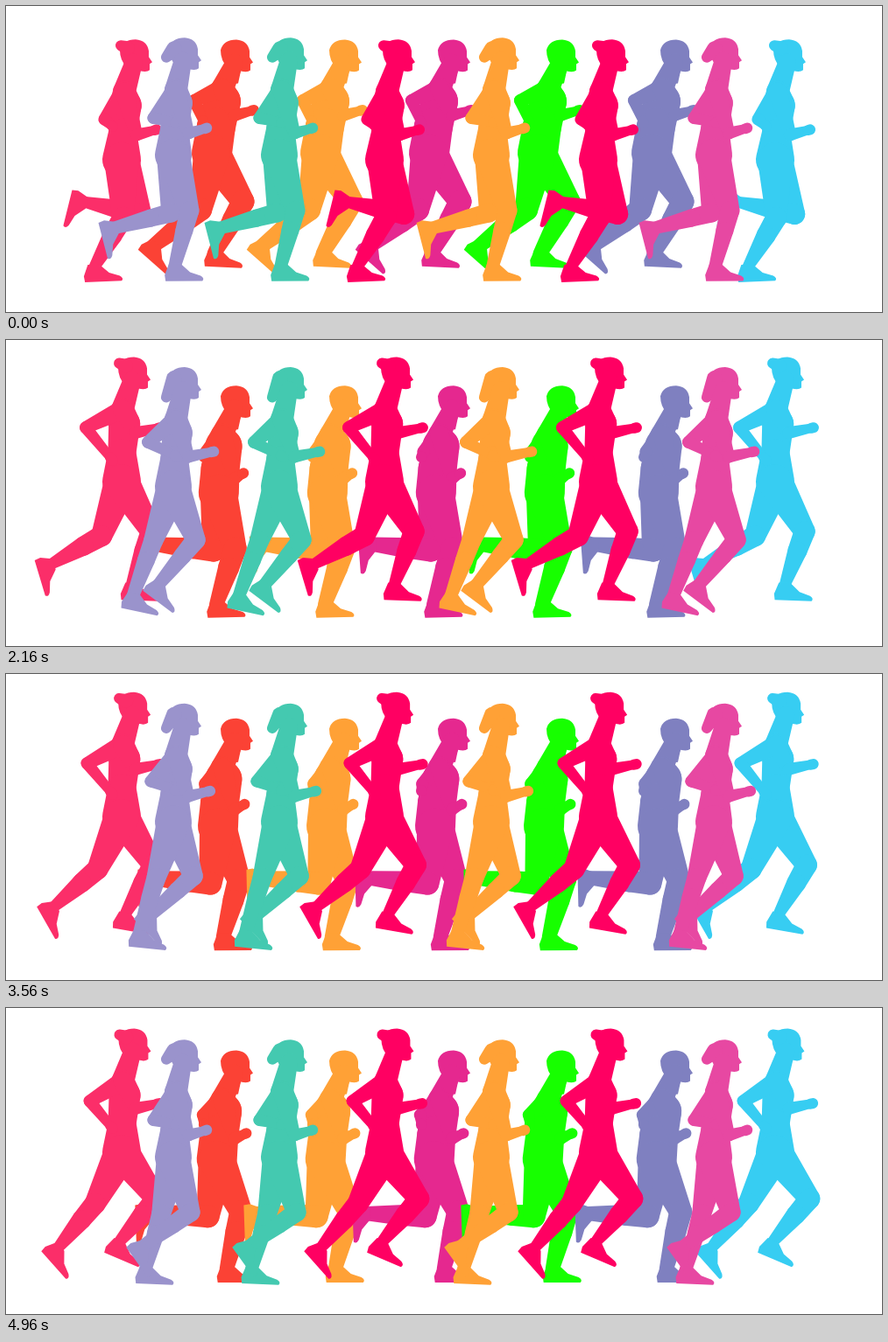
Write an HTML page with a canvas that moves like this. It is 1000x350 px and loops after 5000 ms.

```html
<!DOCTYPE html>
<html lang="en">
<head>
<meta charset="utf-8">
<title>Runners</title>
<style>
html, body { margin: 0; height: 100%; overflow: hidden; background: #fff; }
canvas { display: block; }
</style>
</head>
<body>
<canvas id="stage" width="1000" height="350"></canvas>
<script>
const ctx = document.getElementById('stage').getContext('2d');
const LOOP = 5000, TICK = 40, STEP = 1500;

// Each point moves as base + bob * swing, where bob = cos peaks when the body is lowest (time `low`).
// `gait` is the ankle's closed path around the hip (x, y, foot angle) over two steps, from landing on.
const bun = {
  low: -60, land: 1040,
  head: { base: [146, 47], swing: [1, 9.5] },
  hip: { base: [132, 169], swing: [0, 7] },
  elbow: { base: [102, 115], swing: [11, 15] },
  hand: { base: [174, 121], swing: [-2, 21] },
  rest: [122, 138], neck: [-12, 42],
  chest: 18, waist: 16, pelvis: 22, thigh: 20, knee: 12, ankle: 6, bun: true,
  gait: [[26, 129, -7], [-37, 124, 0], [-78, 106, 58], [-80, 56, 115], [-41, 50, 100], [1, 113, 12]],
  team: [[0, '#fb2e69'], [300, '#ff0062'], [544, '#ff0062'], [746, '#37cdf2']]
};
const ponytail = {
  low: 230, land: 1040,
  head: { base: [203, 50.5], swing: [0, 6.5] },
  hip: { base: [191, 168.5], swing: [0, 3.5] },
  elbow: { base: [164, 120], swing: [8, 14] },
  hand: { base: [235, 131], swing: [-10, 15] },
  hair: { base: [-20, 13], swing: [0, -15] },
  rest: [196, 134], neck: [-9, 42],
  chest: 17, waist: 16, pelvis: 21, thigh: 19, knee: 11, ankle: 7,
  gait: [[14, 130, 0], [-1, 129, 0], [-38, 129, 5], [-69, 111, 44], [-67, 83, 76], [-29, 107, 48]],
  team: [[0, '#9a93cc'], [121, '#44c9b0'], [363, '#ffa136'], [617, '#e748a2']]
};
const shorthair = {
  low: 730, land: 460,
  head: { base: [262, 63.5], swing: [0, 7] },
  hip: { base: [239, 171.5], swing: [4, 3.5] },
  elbow: { base: [222, 118], swing: [7, 10] },
  hand: { base: [277, 136], swing: [-6, 17] },
  rest: [226, 134], neck: [-15, 38],
  chest: 21, waist: 22, pelvis: 23, thigh: 21, knee: 13, ankle: 8,
  gait: [[11, 126, 0], [-32, 126, 2], [-65, 109, 38], [-78, 62, 88], [-56, 68, 65], [0, 113, 5]],
  team: [[0, '#fb4235'], [124, '#ffa136'], [248, '#e5288f'], [372, '#17ff00'], [502, '#7f80c0']]
};
const kinds = [shorthair, bun, ponytail];

const add = (a, b) => [a[0] + b[0], a[1] + b[1]];
const mix = (a, b, f) => [a[0] + (b[0] - a[0]) * f, a[1] + (b[1] - a[1]) * f];
const sway = (part, bob) => part.base.map((v, i) => v + bob * part.swing[i]);

// Smooth closed curve through the gait points, evenly spaced in time.
function ankleAt(gait, time) {
  const n = gait.length, s = ((time / (2 * STEP) % 1) + 1) % 1 * n;
  const i = Math.floor(s), u = s - i;
  const [a, b, c, d] = [n - 1, 0, 1, 2].map(o => gait[(i + o) % n]);
  return b.map((_, q) => b[q] + u / 2 * (c[q] - a[q] +
    u * (2 * a[q] - 5 * b[q] + 4 * c[q] - d[q] + u * (3 * (b[q] - c[q]) + d[q] - a[q]))));
}

// Tapered capsule between two points.
function limb([x1, y1], r1, [x2, y2], r2) {
  const dx = x2 - x1, dy = y2 - y1, d = Math.hypot(dx, dy) || 1;
  const dir = Math.atan2(dy, dx);
  const off = Math.acos(Math.max(-1, Math.min(1, (r1 - r2) / d)));
  ctx.beginPath();
  ctx.arc(x1, y1, r1, dir + off, dir - off + 2 * Math.PI);
  ctx.arc(x2, y2, r2, dir - off, dir + off);
  ctx.fill();
}

// Knee position, bending forward, for thigh length l1 and shin length l2.
function kneeOf([x1, y1], [x2, y2], l1, l2) {
  const dx = x2 - x1, dy = y2 - y1, d = Math.hypot(dx, dy) || 1;
  const a = (d * d + l1 * l1 - l2 * l2) / (2 * d);
  const h = Math.sqrt(Math.max(0, l1 * l1 - a * a));
  return [x1 + (a * dx + h * dy) / d, y1 + (a * dy - h * dx) / d];
}

const headShape = new Path2D('M-17-6Q-14-18 1-18Q14-17 16-5L16 2L20 8L17 10L17 17Q14 20 6 18L3 32L-16 34L-9 14Q-17 6-17-6Z');
const footShape = new Path2D('M-6-5L-11 8L-10 15L32 15Q35 12 30 9L18 5L7-5Z');

function place(shape, [x, y], angle = 0) {
  ctx.save();
  ctx.translate(x, y);
  ctx.rotate(angle * Math.PI / 180);
  ctx.fill(shape);
  ctx.restore();
}

function arm(shoulder, elbow, hand) {
  limb(shoulder, 11, elbow, 7);
  limb(elbow, 7, hand, 5);
  limb(mix(elbow, hand, .9), 6, hand, 6);
}

function leg(k, hip, [x, y, angle]) {
  const ankle = add(hip, [x, y]), knee = kneeOf(hip, ankle, 66, 68), calf = mix(knee, ankle, .35);
  limb(hip, k.thigh, knee, k.knee);
  limb(knee, k.knee, calf, k.knee - 1);
  limb(calf, k.knee - 1, ankle, k.ankle);
  place(footShape, ankle, angle);
}

function runner(k, t) {
  const bob = Math.cos(2 * Math.PI * (t - k.low) / STEP);
  const [head, hip, elbow, hand] = [k.head, k.hip, k.elbow, k.hand].map(p => sway(p, bob));
  const neck = add(head, k.neck);
  const chest = mix(add(neck, [3, 0]), hip, .2), waist = mix(neck, hip, .6);

  place(headShape, head);
  if (k.bun) limb(add(head, [-16, -11]), 6, add(head, [-8, -8]), 8);
  if (k.hair) limb(add(head, [-11, -5]), 9, add(head, sway(k.hair, bob)), 6);
  limb(add(head, [-1, 8]), 10, neck, 13);
  limb(neck, 13, chest, k.chest);
  limb(chest, k.chest, waist, k.waist);
  limb(waist, k.waist, hip, k.pelvis);
  arm(neck, elbow, k.rest);
  arm(neck, [neck[0] + 14, hand[1] + 6], hand);
  for (const shift of [0, STEP]) leg(k, hip, ankleAt(k.gait, t - k.land + shift));
}

function draw(now) {
  const t = Math.floor(now % LOOP / TICK) * TICK;
  ctx.fillStyle = '#fff';
  ctx.fillRect(0, 0, 1000, 350);
  for (const k of kinds) {
    for (const [x, color] of k.team) {
      ctx.save();
      ctx.translate(x, 0);
      ctx.fillStyle = color;
      runner(k, t);
      ctx.restore();
    }
  }
}

let start;
function tick(now) {
  start ??= now;
  draw(now - start);
  requestAnimationFrame(tick);
}
draw(0);
requestAnimationFrame(tick);
</script>
</body>
</html>
```
